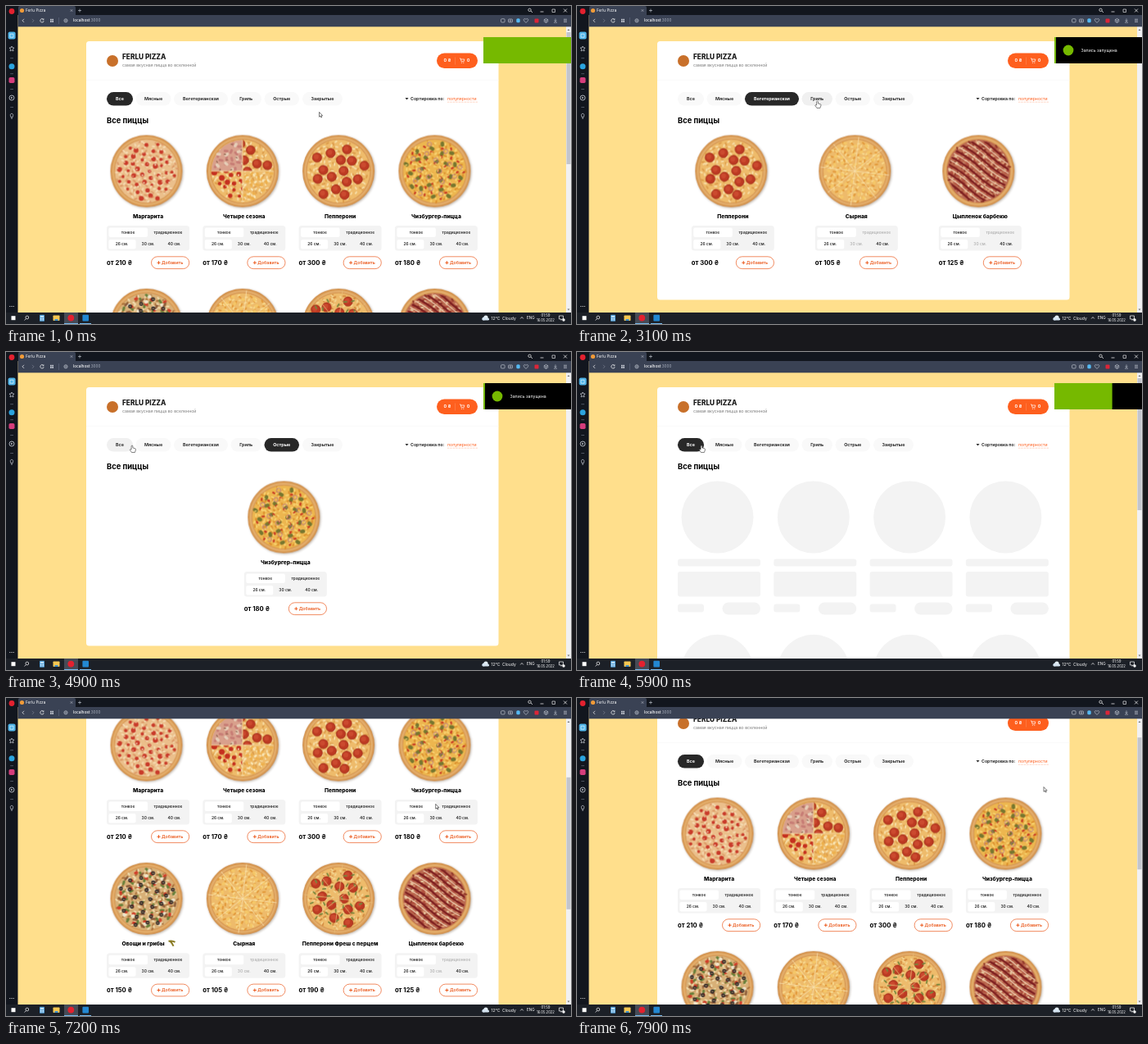
An HTML page with a canvas that plays this animation: 690x388 px, repeating every 8 s.

```html
<!DOCTYPE html>
<html lang="ru">
<head>
<meta charset="utf-8">
<style>
html, body { margin: 0; width: 100%; height: 100%; overflow: hidden; background: #ffdf8c; }
canvas { display: block; width: 690px; height: 388px; }
</style>
</head>
<body>
<canvas></canvas>
<script>
const LOOP = 8000, ORANGE = '#fe5f1e', DARK = '#282828';
const canvas = document.querySelector('canvas');
const density = Math.max(1, window.devicePixelRatio || 1);
canvas.width = 690 * density;
canvas.height = 388 * density;
const screen2d = canvas.getContext('2d');
let c = screen2d;

// ---------- drawing helpers ----------
function rect(x, y, w, h, fill) { c.fillStyle = fill; c.fillRect(x, y, w, h); }
function box(x, y, w, h, r, fill, stroke, line = .7) {
  c.beginPath();
  c.roundRect(x, y, w, h, r);
  if (fill) { c.fillStyle = fill; c.fill(); }
  if (stroke) { c.strokeStyle = stroke; c.lineWidth = line; c.stroke(); }
}
function disc(x, y, r, fill, stroke, line = .7) {
  c.beginPath();
  c.arc(x, y, r, 0, 7);
  if (fill) { c.fillStyle = fill; c.fill(); }
  if (stroke) { c.strokeStyle = stroke; c.lineWidth = line; c.stroke(); }
}
function path(d, x, y, stroke, fill, line = .7) {
  c.save();
  c.translate(x, y);
  const p = new Path2D(d);
  if (fill) { c.fillStyle = fill; c.fill(p); }
  if (stroke) { c.strokeStyle = stroke; c.lineWidth = line; c.stroke(p); }
  c.restore();
}
function text(s, x, y, size, weight = 400, color = '#000', align = 'left') {
  c.font = `${weight} ${size}px Inter, sans-serif`;
  c.textAlign = align;
  c.textBaseline = 'middle';
  c.fillStyle = color;
  c.fillText(s, x, y);
}
function smooth(a, b, t) {
  const k = Math.min(1, Math.max(0, (t - a) / (b - a)));
  return k * k * (3 - 2 * k);
}
// keys: [time, ...values], eased from one to the next
function along(keys, t) {
  let i = keys.findIndex(k => k[0] > t);
  if (i < 0) return keys[keys.length - 1].slice(1);
  i = Math.max(1, i);
  const [a, b] = [keys[i - 1], keys[i]], k = smooth(a[0], b[0], t);
  return a.slice(1).map((v, j) => v + (b[j + 1] - v) * k);
}

// ---------- pizzas ----------
let seed = 1;
function random() { seed = (seed * 16807) % 2147483647; return seed / 2147483647; }
function scatter(n, radius, draw) {
  for (let i = 0; i < n; i++) {
    const r = radius * Math.sqrt((i + .5) / n), a = i * 2.4 + (random() - .5) * .25;
    draw(Math.cos(a) * r, Math.sin(a) * r);
  }
}
const dots = (n, size, color, radius = 36) =>
  scatter(n, radius, (x, y) => disc(x, y, size * (.7 + .6 * random()), color));
function chips(n, w, h, color, radius = 36) {
  scatter(n, radius, (x, y) => {
    c.save();
    c.translate(x, y);
    c.rotate(random() * 6.3);
    box(-w / 2, -h / 2, w, h, h / 2, color);
    c.restore();
  });
}
const salami = (n, size = 5.6, radius = 34) => scatter(n, radius, (x, y) => {
  disc(x, y, size, '#bd3a23', '#a02a18', .8);
  disc(x - 1, y - 1, size * .55, '#cb4a2f');
});
function melt(light = '#f7dda6', dark = '#dd9d4c') {
  chips(90, 4.5, 2, dark, 38);
  chips(110, 4, 2, light, 37);
}
function slices(n, color) {
  for (let i = 0; i < n; i++) {
    const a = (i + .15) * Math.PI / n, x = Math.cos(a) * 42, y = Math.sin(a) * 42;
    path(`M${-x} ${-y}L${x} ${y}`, 0, 0, color, null, .8);
  }
}
function quarter(x, y, draw) {
  c.save();
  c.beginPath();
  c.rect(x, y, 39, 39);
  c.clip();
  draw();
  c.restore();
}
const toppings = {
  margherita() { melt('#f6dcb4', '#dd9a68'); dots(46, 2.4, '#c93b2a'); dots(40, .8, '#f7e7c4'); },
  seasons() {
    melt();
    quarter(-39, -39, () => {
      disc(0, 0, 38, '#d9a08c'); chips(70, 6, 3, '#c77d75'); chips(34, 6, 3.6, '#e6cfb8'); chips(30, 3, 1.2, '#8d624c');
    });
    quarter(0, -39, () => salami(16, 5.4));
    quarter(-39, 0, () => { dots(56, 2.8, '#c5301f'); dots(40, 1, '#f6dfae'); });
    quarter(0, 0, () => { chips(80, 5, 3, '#edb04d'); chips(50, 4, 2.4, '#fae7b6'); });
    path('M-38 0H38M0 -38V38', 0, 0, '#f3d49a', null, 1);
  },
  pepperoni() { melt(); salami(15); },
  burger() {
    melt('#f9d472', '#dc8f2d');
    chips(26, 6.5, 4.5, '#77772f');
    chips(36, 4, 2.4, '#c93c23');
    scatter(16, 34, (x, y) => disc(x, y, 2.6, null, '#b0708c', .8));
    chips(40, 3, 1.4, '#f7d774');
  },
  veggie() {
    melt('#f2ddb0', '#a9703a');
    chips(38, 6, 3, '#68803a');
    chips(32, 5, 3.6, '#d0402a');
    chips(26, 5, 4, '#efe4cb');
    chips(22, 6, 2.6, '#8c5c3b');
    scatter(28, 35, (x, y) => disc(x, y, 1.8, '#8c7355', '#272225', 1.3));
  },
  cheese() { melt('#f8d88c', '#e39a3b'); chips(50, 5, 3.4, '#f5c768'); slices(4, '#f9e3b0'); },
  fresh() { melt('#f4d490', '#d48b40'); salami(13); chips(36, 5, 1.8, '#77873c'); slices(4, '#e9bd77'); },
  bbq() {
    melt('#dfa07a', '#8d3527');
    chips(60, 6, 3, '#b0503f');
    chips(40, 4, 2.4, '#e8c9a0');
    c.save();
    c.beginPath();
    c.arc(0, 0, 37, 0, 7);
    c.clip();
    c.rotate(.6);
    for (let y = -33; y < 38; y += 9.5) {
      path(`M-40 ${y}Q-20 ${y - 3} 0 ${y}T40 ${y}`, 0, 0, '#7e1f20', null, 2.4);
      path(`M-40 ${y + 4}Q-20 ${y + 1} 0 ${y + 4}T40 ${y + 4}`, 0, 0, '#efd3b4', null, 1.2);
    }
    c.restore();
  }
};
const cheeseTone = { margherita: '#ebbf8b', burger: '#edb64f', veggie: '#d8b077', bbq: '#bb6a50' };
function bake(kind, index) {
  const image = document.createElement('canvas');
  image.width = image.height = 100 * density;
  c = image.getContext('2d');
  c.scale(density, density);
  c.translate(50, 50);
  seed = 77 + index * 991;
  c.shadowColor = 'rgba(60,35,10,.35)';
  c.shadowBlur = 3 * density;
  c.shadowOffsetX = c.shadowOffsetY = density;
  const crust = c.createRadialGradient(0, 0, 37, 0, 0, 44);
  crust.addColorStop(0, '#c67b36');
  crust.addColorStop(.5, '#e6b270');
  crust.addColorStop(1, '#cd8740');
  disc(0, 0, 44, crust);
  c.shadowColor = 'transparent';
  disc(0, 0, 38.5, cheeseTone[kind] || '#eebb6b');
  toppings[kind]();
  c = screen2d;
  return image;
}

// ---------- page content ----------
const menu = [
  ['margherita', 'Маргарита', 210],
  ['seasons', 'Четыре сезона', 170],
  ['pepperoni', 'Пепперони', 300],
  ['burger', 'Чизбургер-пицца', 180],
  ['veggie', 'Овощи и грибы', 150],
  ['cheese', 'Сырная', 105, true],
  ['fresh', 'Пепперони Фреш с перцем', 190],
  ['bbq', 'Цыпленок барбекю', 125, true]
].map(([kind, name, price, limited], i) => ({ kind, name, price, limited, image: bake(kind, i) }));
const tabs = [
  { label: 'Все', x: 123, w: 32, items: [0, 1, 2, 3, 4, 5, 6, 7] },
  { label: 'Мясные', x: 158.5, w: 43, items: [6] },
  { label: 'Вегетерианская', x: 205, w: 66, items: [2, 5, 7] },
  { label: 'Гриль', x: 274.5, w: 37.5, items: [0, 1] },
  { label: 'Острые', x: 315.5, w: 42.5, items: [3] },
  { label: 'Закрытые', x: 362, w: 49, items: [] }
];
const clicks = [[-1000, 0], [1900, 1], [2350, 2], [3300, 3], [4050, 4], [5700, 0]];
const LOADING = 280;
const pointerPath = [
  [0, 382.5, 129.5], [200, 382.5, 129.5], [1400, 192, 118.5], [1950, 192, 118.5], [2300, 240, 116],
  [2700, 240, 116], [3100, 293.5, 116], [3400, 293.5, 116], [3900, 337, 115], [4620, 337, 115],
  [4900, 154, 114], [5100, 152, 114], [6000, 152, 114], [6600, 475.5, 122.5], [6800, 478, 124],
  [7300, 530, 130], [7500, 540, 122], [7900, 570, 108.5]
];
const scrollPath = [[6800, 0], [7150, 144], [7300, 144], [7500, 105.5], [7700, 72], [7900, 36]];

function card(pizza, x, y) {
  c.drawImage(pizza.image, x - 52, y - 50, 100, 100);
  const extra = pizza.kind === 'veggie';
  text(pizza.name, extra ? x - 6 : x, y + 55.5, 6.7, 800, '#000', 'center');
  if (extra) path('M-4 -2Q1 -3 4 -1M-2 -2Q1 1 2 4', x + 29, y + 54, '#8a7c25', null, 2);
  box(x - 50.5, y + 66.5, 101, 30.5, 3.5, '#f3f3f3');
  box(x - 48, y + 69, 47.5, 11.5, 2, '#fff');
  box(x - 48, y + 83.5, 33, 11.5, 2, '#fff');
  const muted = pizza.limited ? '#b5b5b5' : '#2c2c2c';
  text('тонкое', x - 24.5, y + 75, 4.8, 600, '#2c2c2c', 'center');
  text('традиционное', x + 24.5, y + 75, 4.8, 600, muted, 'center');
  ['26 см.', '30 см.', '40 см.'].forEach((size, i) =>
    text(size, x - 32 + 32 * i, y + 89, 4.9, 600, i === 1 ? muted : '#2c2c2c', 'center'));
  text(`от ${pizza.price} ₴`, x - 50.5, y + 112, 7.7, 700);
  box(x + 4, y + 104.3, 46.2, 14.8, 7.4, '#fff', '#eb5a1e');
  path('M-2 0H2M0 -2V2', x + 13, y + 111.7, '#eb5a1e', null, 1);
  text('Добавить', x + 16.5, y + 112, 5.35, 600, '#eb5a1e');
}

function skeleton(x, y) {
  const tone = '#f3f3f3';
  disc(x - 2, y, 44, tone);
  box(x - 50.5, y + 51, 101, 9, 3, tone);
  box(x - 50.5, y + 66.5, 101, 30.5, 3, tone);
  box(x - 50.5, y + 106, 32, 10, 3, tone);
  box(x + 4, y + 104, 46.5, 15, 7.5, tone);
}

function page(active, loading, pointer) {
  const { items } = tabs[active], full = loading || active === 0;
  box(98, 43, 503.5, full ? 690 : 315.5, 3.5, '#fff');
  disc(130, 67, 7, '#c8702a');
  text('FERLU PIZZA', 142, 63, 8.3, 800, '#181818');
  text('самая вкусная пицца во вселенной', 142, 72, 5.2, 400, '#7b7b7b');
  box(526, 57.5, 50, 18.5, 9.25, ORANGE);
  text('0 ₴', 539, 66.8, 5.4, 700, '#fff', 'center');
  rect(548, 62.5, .4, 9, '#ff9a70');
  path('M-3 -2.5H-1.8L-1 1.2H2.2L2.8 -1.5H-1.5', 557, 66.5, '#fff');
  disc(556.3, 69.3, .5, '#fff');
  disc(558.8, 69.3, .5, '#fff');
  text('0', 564.5, 66.8, 5.4, 700, '#fff', 'center');
  rect(98, 90.3, 503.5, .5, '#f4f4f4');

  tabs.forEach((tab, i) => {
    const hover = tab === pointer.tab;
    box(tab.x, 105, tab.w, 16.6, 8.3, i === active ? DARK : hover ? '#f0f0f0' : '#f9f9f9');
    text(tab.label, tab.x + tab.w / 2, 113.3, 5.4, 700, i === active ? '#fff' : '#2c2c2c', 'center');
  });
  path('M-2 -1H2L0 1.5Z', 489.5, 113, null, '#2c2c2c');
  text('Сортировка по:', 494, 113.3, 5.25, 700, '#2c2c2c');
  text('популярности', 539, 113.3, 5.2, 400, ORANGE);
  c.setLineDash([.7, .7]);
  path('M0 0H37', 539, 117.2, ORANGE, null, .4);
  c.setLineDash([]);
  text('Все пиццы', 123, 139.7, 9.4, 700);

  const column = i => 173.5 + 117.3 * (i % 4), row = i => 201.5 + 187.3 * Math.floor(i / 4);
  if (loading) for (let i = 0; i < 8; i++) skeleton(column(i), row(i));
  else items.forEach((id, i) => {
    if (full) card(menu[id], column(i), row(i));
    else card(menu[id], 114.8 + 453 / items.length * (i + .5), 201.5);
  });
}

// ---------- browser and desktop ----------
function browser(scroll, scrollable) {
  const bar = '#3a4254', edge = '#12161e', ink = '#cfd3dc';
  rect(684, 25, 6, 349, '#f1f1f3');
  path('M-1.5 1L0 -1L1.5 1Z', 687, 29, null, '#777');
  path('M-1.5 -1L0 1L1.5 -1Z', 687, 370.5, null, '#777');
  if (scrollable) rect(684.5, 32 + scroll * .45, 5, 161, '#c3c5cc');

  rect(0, 0, 690, 11, edge);
  rect(0, 0, 14.5, 374, edge);
  rect(14.5, 11, 675.5, 14.3, bar);
  box(15, 0, 70, 12, [2, 2, 0, 0], bar);
  disc(19.5, 5.5, 2.6, '#f09a38');
  text('Ferlu Pizza', 24, 5.8, 4.7, 400, '#fff');
  path('M-1.3 -1.3L1.3 1.3M1.3 -1.3L-1.3 1.3', 80, 5.5, ink, null, .5);
  path('M-2 0H2M0 -2V2', 90, 5.5, ink, null, .6);
  disc(639.5, 4.8, 1.7, null, '#fff');
  path('M1 1L3 3', 640, 5, '#fff');
  path('M-2 1H2', 654.5, 6, '#fff');
  box(667, 4, 3.5, 3.5, 0, null, '#fff', .6);
  path('M-2 -2L2 2M2 -2L-2 2', 683, 5.5, '#fff');

  path('M1 -2L-1 0L1 2', 21, 17.8, '#fff');
  path('M-1 -2L1 0L-1 2', 33, 17.8, '#7e8594');
  path('M1.6 -1.6A2.2 2.2 0 1 0 2.2 .4M2 -2.4V-1H.6', 44, 17.8, '#fff');
  for (let i = 0; i < 4; i++) rect(54 + i % 2 * 2.3, 15.8 + (i >> 1) * 2.3, 1.7, 1.7, ink);
  rect(64.5, 14, .5, 8, '#69728a');
  disc(73, 17.8, 2.1, null, ink, .6);
  path('M-2 0H2M0 -2V2', 73, 17.8, ink, null, .4);
  text('localhost', 82, 18, 4.7, 500, '#fff');
  c.font = '500 4.7px Inter, sans-serif';
  text(':3000', 82 + c.measureText('localhost').width, 18, 4.7, 400, '#aab0bf');

  box(604.5, 15.7, 4.6, 4.2, 1, null, ink, .6);
  box(613.5, 16, 5, 3.8, .8, null, ink, .6);
  disc(616, 17.9, 1, null, ink, .5);
  box(623.3, 15.3, 4.4, 5, 1.5, '#55b9f3');
  path('M0 2.3C-5 -1 -2 -4 0 -1.5C2 -4 5 -1 0 2.3Z', 635, 18, ink, null, .6);
  box(645.5, 15.5, 5, 5, 1, '#dc2537');
  path('M0 -2.4L2.2 -1.2V1.4L0 2.5L-2.2 1.4V-1.2ZM-2.2 -1.2L0 0L2.2 -1.2M0 0V2.5', 659.5, 17.8, ink, null, .6);
  path('M0 -2.4V1M-1.4 -.3L0 1L1.4 -.3M-2 2.3H2', 671, 17.8, ink, null, .6);
  path('M-2 -1.6H2M-2 0H2M-2 1.6H2', 683, 17.8, ink, null, .6);

  disc(7, 6.5, 3.4, '#e3212f');
  box(2.6, 31.6, 9, 9, 2, '#4fb4e8');
  path('M-2 -2H2V2H-2Z', 7, 36.2, '#fff', null, .6);
  path('M0 -3L1 -1H3L1.5 .6L2 3L0 1.8L-2 3L-1.5 .6L-3 -1H-1Z', 7, 52, ink, null, .7);
  [63.5, 82.5, 101, 123].forEach(y => rect(5.2, y, 3.8, .6, '#757c8c'));
  disc(7, 73.8, 3.5, '#2ba4df');
  box(3.5, 87, 7, 7, 1.8, '#d53d7b');
  disc(7, 112, 3, null, ink, .8);
  path('M-.8 -1.3L1.4 0L-.8 1.3Z', 7, 112, null, ink);
  path('M-1 2V1.2C-4 -4 4 -4 1 1.2V2ZM-.8 3.2H.8', 7, 134, ink);
  [4.8, 7, 9.2].forEach(x => disc(x, 366.5, .55, '#fff'));
}

function taskbar() {
  rect(0, 374, 690, 14, '#1c2027');
  rect(6.5, 378.2, 5, 5, '#fff');
  disc(25.8, 380, 1.9, null, '#fff');
  path('M-1 1L-3 3', 25.5, 380.5, '#fff');
  box(41, 376.8, 6, 8, .8, '#4f9ed8');
  rect(42, 378, 4, 1.6, '#d9eefa');
  for (let i = 0; i < 6; i++) rect(42 + i % 3 * 1.5, 380.7 + (i > 2) * 1.8, 1, 1, '#fff');
  box(57.5, 377.6, 8, 6.4, .7, '#f5c751');
  rect(59.5, 382, 4, 2, '#3f91cd');
  rect(71, 374, 17, 14, '#464b56');
  disc(79.3, 380.6, 3.9, '#e3212f');
  box(93.4, 376.8, 7.6, 7.6, 1, '#2388d2');
  rect(71, 387, 17, 1, '#76b9ed');
  rect(90, 387, 14, 1, '#76b9ed');

  disc(583.5, 381.5, 2, '#c4d9eb');
  disc(586, 380.2, 2.6, '#e2edf6');
  box(581.5, 380.7, 8.5, 2.9, 1.4, '#d5e4f1');
  text('12°C', 592.5, 381, 5, 400, '#fff');
  text('Cloudy', 606, 381, 5, 400, '#fff');
  path('M-1.8 1L0 -1L1.8 1', 630, 380.5, '#fff');
  text('ENG', 636, 381, 4.6, 400, '#fff');
  text('01:59', 659, 377.8, 4.4, 400, '#fff', 'center');
  text('16.05.2022', 659, 384.2, 4.2, 400, '#fff', 'center');
  path('M-2.5 -2.5H2.5V1.5H1L0 2.8V1.5H-2.5Z', 678, 380.5, '#fff');
  disc(681, 383, 1.7, '#fff');
}

function toast(t) {
  const gone = smooth(5950, 6200, t) * 107;
  const cover = 107 - 105 * smooth(100, 450, t) * (1 - smooth(5750, 6000, t));
  if (gone >= 107) return;
  rect(583 + gone, 38, 107, 32, '#76b900');
  if (cover >= 107) return;
  c.save();
  c.beginPath();
  c.rect(583 + cover, 38, 107, 32);
  c.clip();
  rect(583, 38, 107, 32, '#000');
  c.globalAlpha = smooth(350, 700, t) * (1 - smooth(5700, 5850, t));
  disc(600, 54, 6.4, '#76b900');
  text('Запись запущена', 615.5, 54.4, 5.2, 400, '#fff');
  c.restore();
}

function cursor({ x, y, tab }) {
  c.lineJoin = 'round';
  if (tab) path('M-.9 .6Q0 -.6 .9 .6V3L4 3.8Q4.7 4.2 4.3 6L3.4 8.5H-.6L-2.7 5.3Q-2.6 4.2 -.9 5Z', x, y, '#333', '#fff', .6);
  else path('M0 0V5.8L1.4 4.6L2.3 6.6L3.2 6.2L2.3 4.3H4.1Z', x, y, '#222', '#fff', .6);
}

function draw(t) {
  const [x, y] = along(pointerPath, t), [scroll] = along(scrollPath, t);
  const pointer = { x, y, tab: tabs.find(b => x > b.x && x < b.x + b.w && y + scroll > 105 && y + scroll < 121.6) };
  const [clickTime, active] = clicks.filter(k => k[0] <= t).pop();
  const loading = t - clickTime < LOADING;
  c.setTransform(density, 0, 0, density, 0, 0);
  rect(0, 0, 690, 388, '#ffdf8c');
  c.save();
  c.beginPath();
  c.rect(14.5, 25, 669.5, 349);
  c.clip();
  c.translate(0, -scroll);
  page(active, loading, pointer);
  c.restore();
  browser(scroll, loading || active === 0);
  taskbar();
  toast(t);
  cursor(pointer);
}

const start = performance.now();
function tick() {
  draw((performance.now() - start) % LOOP);
  requestAnimationFrame(tick);
}
tick();
</script>
</body>
</html>
```
